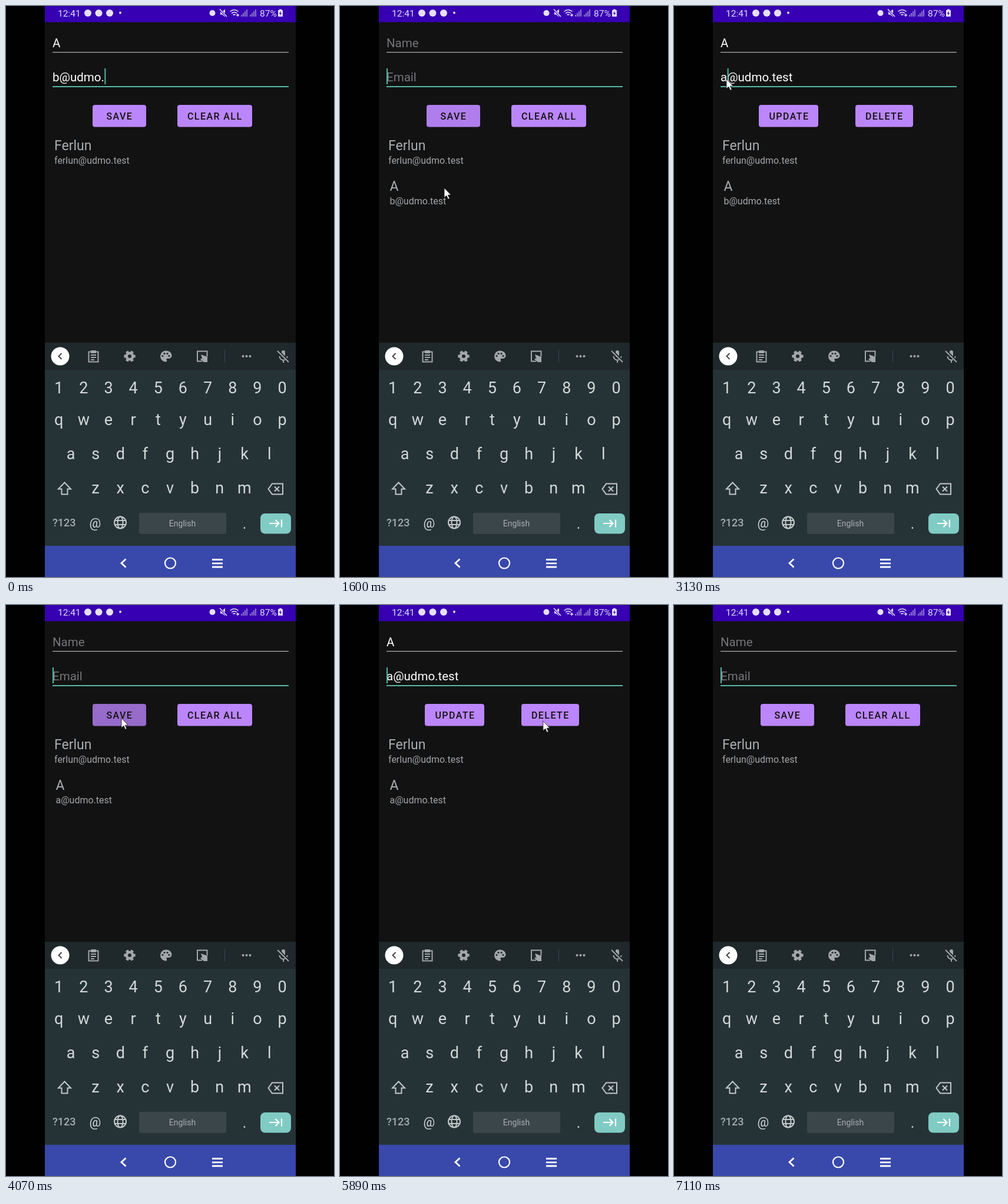
Animation of 557 by 970 pixels, one loop 7160 ms. Source, as an HTML page:

```html
<!DOCTYPE html>
<html lang="en">
<head>
<meta charset="utf-8">
<title>Contact form</title>
<style>
  html, body { margin: 0; width: 100%; height: 100%; overflow: hidden; background: #000; }
  svg { display: block; width: 557px; height: 970px; font-family: Roboto, sans-serif; }
  text { white-space: pre; }
  .field { font-size: 20.5px; fill: #fff; }
  .field.hint { fill: #75757a; }
  .btn text { font-size: 16px; font-weight: 500; letter-spacing: 1.42px; fill: #111; }
  .title { font-size: 23px; fill: #a9adb2; }
  .mail { font-size: 16px; fill: #a3a7ac; }
  .keys text { font-size: 27px; fill: #d3d8da; text-anchor: middle; }
  .line { fill: none; stroke: #c3c8ca; stroke-width: 2; }
  .tool { fill: none; stroke: #a3a8aa; stroke-width: 2; }
  .solid { fill: #a3a8aa; stroke: none; }
  .status { fill: #e6e0f5; font-size: 15.5px; }
</style>
</head>
<body>
<svg viewBox="0 0 557 970">
  <defs>
    <clipPath id="screen"><rect x="66" width="426" height="970"/></clipPath>
    <g id="bars">
      <path d="M0 15v3M3 12v6M6 9v9M9 6v12" stroke="#a294d6" stroke-width="1.6"/>
    </g>
  </defs>
  <rect width="557" height="970" fill="#010101"/>
  <rect x="66" width="426" height="970" fill="#121212"/>
  <rect x="66" width="426" height="27.5" fill="#3700b3"/>

  <g class="status">
    <text x="88" y="17.5">12:41</text>
    <circle cx="139" cy="12" r="6"/>
    <circle cx="157.5" cy="12" r="6"/>
    <circle cx="176" cy="12" r="6"/>
    <circle cx="194" cy="11.5" r="1.9"/>
    <circle cx="350.5" cy="12" r="5"/>
    <path d="M364 9.500h3l5-4v13l-5-4h-3z"/>
    <path d="M363 6l12 12" stroke="#3700b3" stroke-width="3.500"/>
    <path d="M363 5.500l12 12.500" stroke="#e6e0f5" stroke-width="1.600"/>
    <g fill="none" stroke="#e6e0f5" stroke-width="1.600">
      <path d="M380.500 9.500q7-6 14 0M383 12.500q4.500-4 9 0M385.500 15.300q2-1.800 4 0M391 15.500h5M393.500 13v5"/>
    </g>
    <use href="#bars" x="400"/>
    <use href="#bars" x="415"/>
    <text x="431" y="17.500">87%</text>
    <path d="M464 5.500h4v1.500h2v11h-8v-11h2z"/>
    <path d="M466.800 8.500l-3 4.500h2l-.7 3.500 3.200-4.500h-2z" fill="#3700b3"/>
  </g>

  <rect x="79" y="78" width="401" height="1.200" fill="#b5b5b5"/>
  <rect x="79" y="136" width="401" height="2" fill="#58b7a6"/>
  <text id="name" class="field" x="79" y="70"></text>
  <text id="email" class="field" x="79" y="128"></text>
  <rect id="caret" y="106" width="2" height="27" fill="#58b7a6"/>

  <g id="buttons"></g>

  <text class="title" x="82" y="245">Ferlun</text>
  <text class="mail" x="82" y="267.500">ferlun@udmo.test</text>
  <g id="row">
    <text class="title" x="84.500" y="314">A</text>
    <text id="rowMail" class="mail" x="84.500" y="336.500"></text>
  </g>

  <rect x="66" y="572" width="426" height="46" fill="#1f282b"/>
  <rect x="66" y="618" width="426" height="299" fill="#263336"/>
  <g class="tool">
    <circle cx="92" cy="595" r="15.500" fill="#fff" stroke="none"/>
    <path d="M94.500 590l-5 5 5 5" stroke="#444"/>
    <path d="M140.500 587.500h16v17h-16zM144 593h9M144 597h9M144 601h6"/>
    <rect class="solid" x="144" y="585" width="9" height="5" rx="1"/>
    <circle cx="210" cy="595" r="5.200" stroke-width="4.400"/>
    <circle cx="210" cy="595" r="8.200" stroke-width="3" pathLength="48" stroke-dasharray="4.400 3.600" stroke-dashoffset="2.200"/>
    <g transform="translate(259.500 583)">
      <path class="solid" d="M12 2.500a9.500 9.500 0 0 0 0 19c1 0 1.700-.8 1.700-1.600 0-1-.8-1.300-.8-2.400 0-.9.700-1.500 1.500-1.500H17a5 5 0 0 0 5-5c0-5-4.500-8.500-10-8.500z"/>
      <g fill="#1f282b" stroke="none">
        <circle cx="6.500" cy="11.500" r="1.600"/><circle cx="9.500" cy="7.500" r="1.600"/>
        <circle cx="14.500" cy="7.500" r="1.600"/><circle cx="17.500" cy="11.500" r="1.600"/>
      </g>
    </g>
    <path d="M333 603.500h-8v-17h16.500v9"/>
    <path class="solid" d="M331 592l11 4v9h-6l-6-5 1.500-1.500 2 1z"/>
    <path d="M371.500 584v22" stroke="#39464a" stroke-width="1"/>
    <g class="solid"><circle cx="402.500" cy="595" r="2"/><circle cx="408.500" cy="595" r="2"/><circle cx="414.500" cy="595" r="2"/></g>
    <rect class="solid" x="468" y="585" width="6" height="12" rx="3"/>
    <path d="M464.500 595a6.500 6.500 0 0 0 13 0M471 601.500v4.500"/>
    <path d="M462 586l19 19" stroke="#1f282b" stroke-width="4.500"/>
    <path d="M461 586l19 19"/>
  </g>

  <g id="keys" class="keys"></g>
  <path class="line" d="M99.500 809.500l10.500 11h-5.500v9h-10v-9h-5.500z"/>
  <path class="line" d="M452 811.500h18v18h-18l-6.500-9zM456 816.500l8 8M464 816.500l-8 8"/>
  <text x="79" y="884" font-size="18" font-weight="500" fill="#a5adb0">?123</text>
  <text x="151.500" y="885.500" font-size="22" text-anchor="middle" fill="#d3d8da">@</text>
  <g class="line" stroke-width="1.700">
    <circle cx="194" cy="877.500" r="10"/>
    <ellipse cx="194" cy="877.500" rx="4.500" ry="10"/>
    <path d="M185 874h18M185 881h18"/>
  </g>
  <rect x="226" y="861" width="148" height="36" rx="3" fill="#3b464a"/>
  <text x="299.500" y="884" font-size="14" text-anchor="middle" fill="#a8b0b3">English</text>
  <text x="405" y="888" font-size="25" text-anchor="middle" fill="#d3d8da">.</text>
  <rect x="432" y="862" width="52" height="34.500" rx="8" fill="#80cbc4"/>
  <path d="M447 879h16M457.500 873l6 6-6 6M468 872.500v13" fill="none" stroke="#fff" stroke-width="2.200"/>

  <rect x="66" y="917" width="426" height="53" fill="#3949ab"/>
  <g fill="none" stroke="#fff">
    <path d="M203.500 939.500l-7.500 7 7.500 7" stroke-width="2.800"/>
    <circle cx="279" cy="946.500" r="9" stroke-width="2.200"/>
    <path d="M350 940.500h18M350 946.800h18M350 953h18" stroke-width="2.800"/>
  </g>

  <g clip-path="url(#screen)">
    <path id="mouse" d="M0 0V16.500l3.800-3.500 2.800 6.200 2.500-1.100-2.800-6H11.500z" fill="#fff" stroke="#111" stroke-width=".8"/>
    <circle id="halo" r="15" fill="#fff000" fill-opacity=".53"/>
  </g>
</svg>
<script>
const LOOP = 7160;
const $ = id => document.getElementById(id);
const HOST = '@udmo.test';

function add(parent, tag, attrs, text = '') {
  const el = document.createElementNS('http://www.w3.org/2000/svg', tag);
  for (const k in attrs) el.setAttribute(k, attrs[k]);
  el.textContent = text;
  parent.append(el);
  return el;
}

[['1234567890', 89.7, 658], ['qwertyuiop', 89.7, 712], ['asdfghjkl', 110, 770], ['zxcvbnm', 152, 828]]
  .forEach(([chars, x, y]) => [...chars].forEach((c, i) => add($('keys'), 'text', { x: x + 42.15 * i, y }, c)));

function button(label, x, w, textX) {
  const g = add($('buttons'), 'g', { class: 'btn' });
  const box = { x, y: 168, width: w, height: 37.5, rx: 4 };
  add(g, 'rect', { ...box, fill: '#bb86fc' });
  const shade = add(g, 'rect', { ...box, fill: '#000' });
  add(g, 'text', { x: textX, y: 193 }, label);
  return { g, shade };
}
const saveMode = [button('SAVE', 147, 91, 170.5), button('CLEAR ALL', 291, 127, 308)];
const editMode = [button('UPDATE', 144, 101, 161.5), button('DELETE', 308, 98, 325)];

// time, name, email, caret index, editing, second row's email
const A = 'a' + HOST, B = 'b' + HOST;
const states = [
  [0, 'A', B.slice(0, 7), 7, false, ''],
  [250, 'A', B.slice(0, 8), 8, false, ''],
  [420, 'A', B.slice(0, 9), 9, false, ''],
  [580, 'A', B.slice(0, 10), 10, false, ''],
  [720, 'A', B, 11, false, ''],
  [1260, '', '', 0, false, B],
  [1850, 'A', B, 0, true, B],
  [2450, 'A', B, 1, true, B],
  [2700, 'A', HOST, 0, true, B],
  [2950, 'A', A, 1, true, B],
  [4020, '', '', 0, false, A],
  [5200, 'A', A, 0, true, A],
  [6200, '', '', 0, false, '']
];

// pointer waypoints: time, x, y
const path = [
  [900, 290, 240], [1120, 195, 191], [1260, 195, 191], [1580, 177, 309], [1900, 177, 309],
  [2340, 89, 124], [3400, 89, 124], [3860, 196, 192], [4060, 196, 192], [4660, 136, 318],
  [5250, 136, 318], [5900, 345, 197], [6500, 345, 197], [6620, 332, 200], [6920, 410, -24]
];
const clicks = [1130, 1730, 2390, 3910, 5060, 6130];
const presses = [[1150, 0], [3930, 0], [6150, 1]];

function setField(el, value, hint) {
  const text = value || hint;
  if (el.textContent !== text) el.textContent = text;
  el.classList.toggle('hint', !value);
}
const show = (el, on) => el.setAttribute('visibility', on ? 'visible' : 'hidden');

function pointer(t) {
  const i = path.findIndex(p => p[0] > t);
  if (i < 1) return null;
  const [t0, x0, y0] = path[i - 1], [t1, x1, y1] = path[i];
  const u = (t - t0) / (t1 - t0), e = u * u * (3 - 2 * u);
  return [x0 + (x1 - x0) * e, y0 + (y1 - y0) * e];
}

function draw(t) {
  const [, name, email, at, editing, mail] = states.filter(s => s[0] <= t).pop();
  setField($('name'), name, 'Name');
  setField($('email'), email, 'Email');
  $('caret').setAttribute('x', at ? 79.5 + $('email').getSubStringLength(0, at) : 79);
  show($('row'), mail);
  $('rowMail').textContent = mail;

  saveMode.forEach(b => show(b.g, !editing));
  editMode.forEach(b => show(b.g, editing));
  [0, 1].forEach(side => {
    const press = presses.find(([at, s]) => s === side && t >= at && t < at + 600);
    const dark = press ? 0.26 * (1 - (t - press[0]) / 600) : 0;
    [saveMode, editMode].forEach(m => m[side].shade.setAttribute('opacity', dark));
  });

  const pos = pointer(t);
  show($('mouse'), pos);
  show($('halo'), pos && clicks.some(c => t >= c && t < c + 120));
  if (pos) {
    const move = `translate(${pos[0]} ${pos[1]})`;
    $('mouse').setAttribute('transform', move);
    $('halo').setAttribute('transform', move);
  }
}

const start = performance.now();
function tick() {
  draw((performance.now() - start) % LOOP);
  requestAnimationFrame(tick);
}
tick();
</script>
</body>
</html>
```
